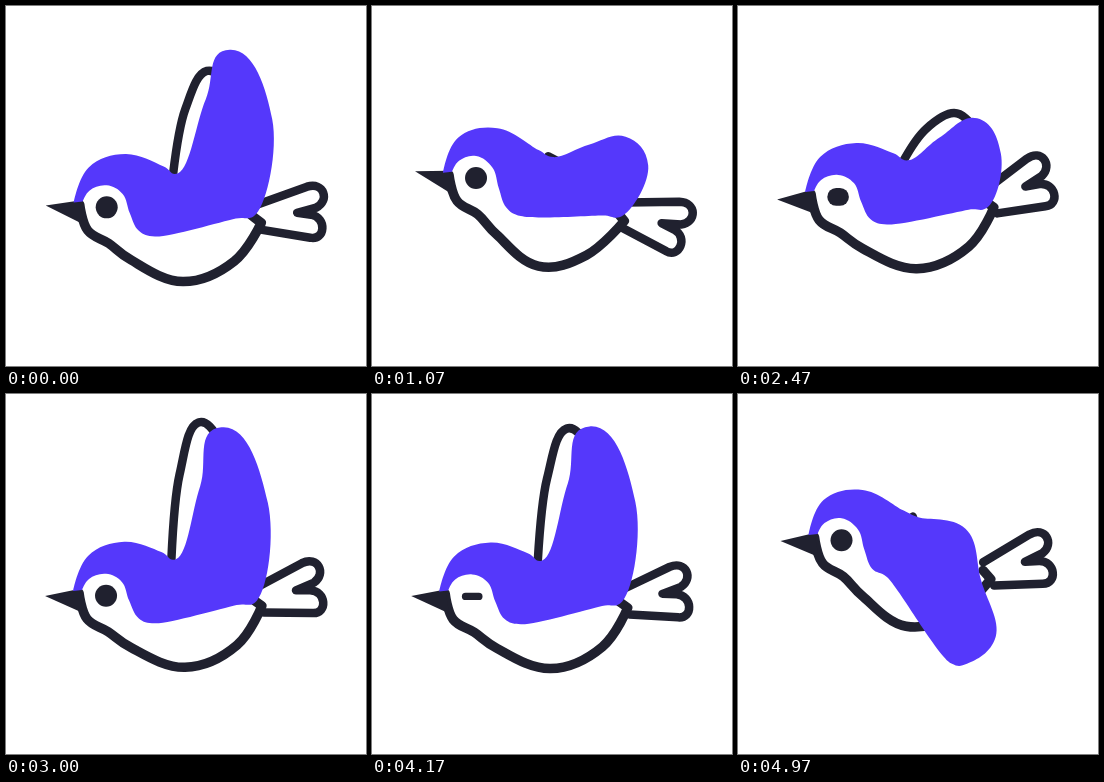
An HTML page with a canvas for the animation above (5000 ms loop, 360 by 360 pixels).

```html
<!DOCTYPE html>
<html lang="en">
<head>
<meta charset="utf-8">
<title>Flying bird</title>
<style>
html, body { margin: 0; width: 100%; height: 100%; overflow: hidden; background: #fff; }
canvas { display: block; }
</style>
</head>
<body>
<canvas width="360" height="360"></canvas>
<script>
const ctx = document.querySelector('canvas').getContext('2d');
const LOOP = 5000, TICK = 100 / 3, FLAP = 17.75;   // flap length in ticks
const DARK = '#20212f', PURPLE = '#5538fb';
const BLINKS = [1870, 2560, 4208];

// Wing poses over one flap: leading edge, tip, trailing edge, rear corner
const WING = [
  { at: .4, pts: [[198, 90], [221, 37], [265, 110], [250, 208]] },
  { at: 2, pts: [[193, 102], [216, 46], [260, 115], [252, 204]] },
  { at: 2.9, pts: [[200, 130], [238, 106], [263, 142], [252, 197]] },
  { at: 7, pts: [[227, 135], [243, 185], [258, 240], [230, 267]] },
  { at: 9.7, pts: [[227, 124], [243, 180], [250, 285], [228, 321]] },
  { at: 14.25, pts: [[218, 139], [254, 133], [276, 162], [251, 211]] }
];

const wave = (k, shift) => Math.cos(2 * Math.PI * (k - shift) / FLAP);
const mix = (a, b, t) => a + (b - a) * t;
const between = (p, q, t) => [mix(p[0], q[0], t), mix(p[1], q[1], t)];
const dist = (p, q) => Math.hypot(q[0] - p[0], q[1] - p[1]);

// Smooth periodic interpolation between the wing poses
function wingAt(k) {
  const n = WING.length;
  const next = WING.findIndex(w => w.at > k), i = (next < 0 ? n : next) - 1;
  const [a, b, c, d] = [-1, 0, 1, 2].map(s => {
    const j = i + s, { at, pts } = WING[(j + n) % n];
    return { at: at + Math.floor(j / n) * FLAP, pts };
  });
  const h = c.at - b.at, u = (k - b.at) / h, v = 1 - u;
  return b.pts.map((p, m) => p.map((x, axis) => {
    const value = key => key.pts[m][axis], y = value(c);
    const m1 = (y - value(a)) / (c.at - a.at) * h, m2 = (value(d) - x) / (d.at - b.at) * h;
    return v * v * (1 + 2 * u) * x + u * v * v * m1 + u * u * (3 - 2 * u) * y - u * u * v * m2;
  }));
}

// Curve through points; each tangent bisects its two neighbouring chords
function spline(pts) {
  const handle = (i, side) => {
    const p = pts[i], a = pts[i - 1], b = pts[i + 1];
    if (!a || !b) return p;
    const la = dist(a, p), lb = dist(p, b);
    const dir = [0, 1].map(n => (p[n] - a[n]) / la + (b[n] - p[n]) / lb);
    const len = Math.min(.36 * Math.sqrt(la * lb), .5 * (side < 0 ? la : lb));
    const scale = side * len / (Math.hypot(...dir) || 1);
    return [p[0] + dir[0] * scale, p[1] + dir[1] * scale];
  };
  ctx.beginPath();
  ctx.moveTo(...pts[0]);
  for (let i = 1; i < pts.length; i++)
    ctx.bezierCurveTo(...handle(i - 1, 1), ...handle(i, -1), ...pts[i]);
}

function draw(ms) {
  const k = ms / TICK % FLAP;
  const head = 168 + 34.5 * wave(k, .75) - 200;
  const rear = 200 + 17 * wave(k, -1.4) - 216;
  const tilt = rear - head;
  const tail = -20 * wave(k, FLAP / 4);
  // The head only rises and falls; the body also turns towards the rear
  const place = (x, y) => {
    const t = Math.min(1, Math.max(0, (x - 100) / 150));
    return [x + tilt * mix(.12, (210 - y) / 75, t), y + mix(head, rear, t)];
  };
  const wing = wingAt(k);

  ctx.fillStyle = '#fff';
  ctx.fillRect(0, 0, 360, 360);
  ctx.strokeStyle = DARK;
  ctx.lineCap = ctx.lineJoin = 'round';
  ctx.lineWidth = 8.5;

  // far wing, swinging ahead of and behind the near one
  const root = place(168, 167), tip = wing[1];
  const top = [tip[0] - 23, tip[1] + 22 - 34 * wave(2 * k, FLAP / 4)];
  const mid = between(root, top, .6);
  spline([root, [mid[0] - 8, mid[1] - 3], top, [top[0] + 16, top[1] + 10]]);
  ctx.stroke();

  // tail
  ctx.save();
  ctx.translate(...place(254, 216));
  ctx.rotate(tail * Math.PI / 180);
  ctx.beginPath();
  ctx.moveTo(-4, -16);
  ctx.lineTo(47, -34);
  ctx.bezierCurveTo(64, -39, 70, -20, 56, -13);
  ctx.lineTo(37, -8);
  ctx.lineTo(51, -6);
  ctx.bezierCurveTo(67, -3, 65, 20, 50, 17);
  ctx.lineTo(2, 9);
  ctx.stroke();
  ctx.restore();

  // body
  ctx.lineWidth = 9.5;
  spline([place(74, 197), place(82, 223), place(103, 236), place(125, 253),
    place(176, 275.5), place(227, 256), place(255, 218)]);
  ctx.fillStyle = '#fff';
  ctx.fill();
  ctx.lineTo(...place(245, 210));
  ctx.stroke();

  // beak
  const [bx, by] = place(40, 198);
  ctx.fillStyle = DARK;
  ctx.beginPath();
  ctx.moveTo(bx, by - .25 * tail);
  ctx.lineTo(...place(74, 193));
  ctx.lineTo(...place(78, 217));
  ctx.fill();

  // cap, back and near wing
  const saddle = place(173, 167), corner = wing[3], chest = place(149, 230);
  const edge = between(corner, chest, .2);
  edge[1] += .2 * Math.max(0, corner[1] - chest[1]);   // a hanging wing bulges forward
  spline([
    place(68, 195), place(83, 160), place(120, 147), [saddle[0] - 15, saddle[1] - 7], saddle,
    ...wing, edge, chest,
    place(133, 224), place(124, 206), place(117, 187), place(101, 178), place(84, 183), place(77, 194)
  ]);
  ctx.closePath();
  ctx.fillStyle = PURPLE;
  ctx.fill();

  // eye
  const open = Math.min(1, ...BLINKS.map(b => Math.abs(ms - b) / 110));
  const w = 20 + 2 * open, h = Math.max(4, 22 * open);
  const [ex, ey] = place(101, 200);
  ctx.fillStyle = DARK;
  ctx.beginPath();
  ctx.roundRect(ex - w / 2, ey - h / 2, w, h, h / 2);
  ctx.fill();
}

const start = performance.now();
function frame() {
  draw((performance.now() - start) % LOOP);
  requestAnimationFrame(frame);
}
frame();
</script>
</body>
</html>
```
